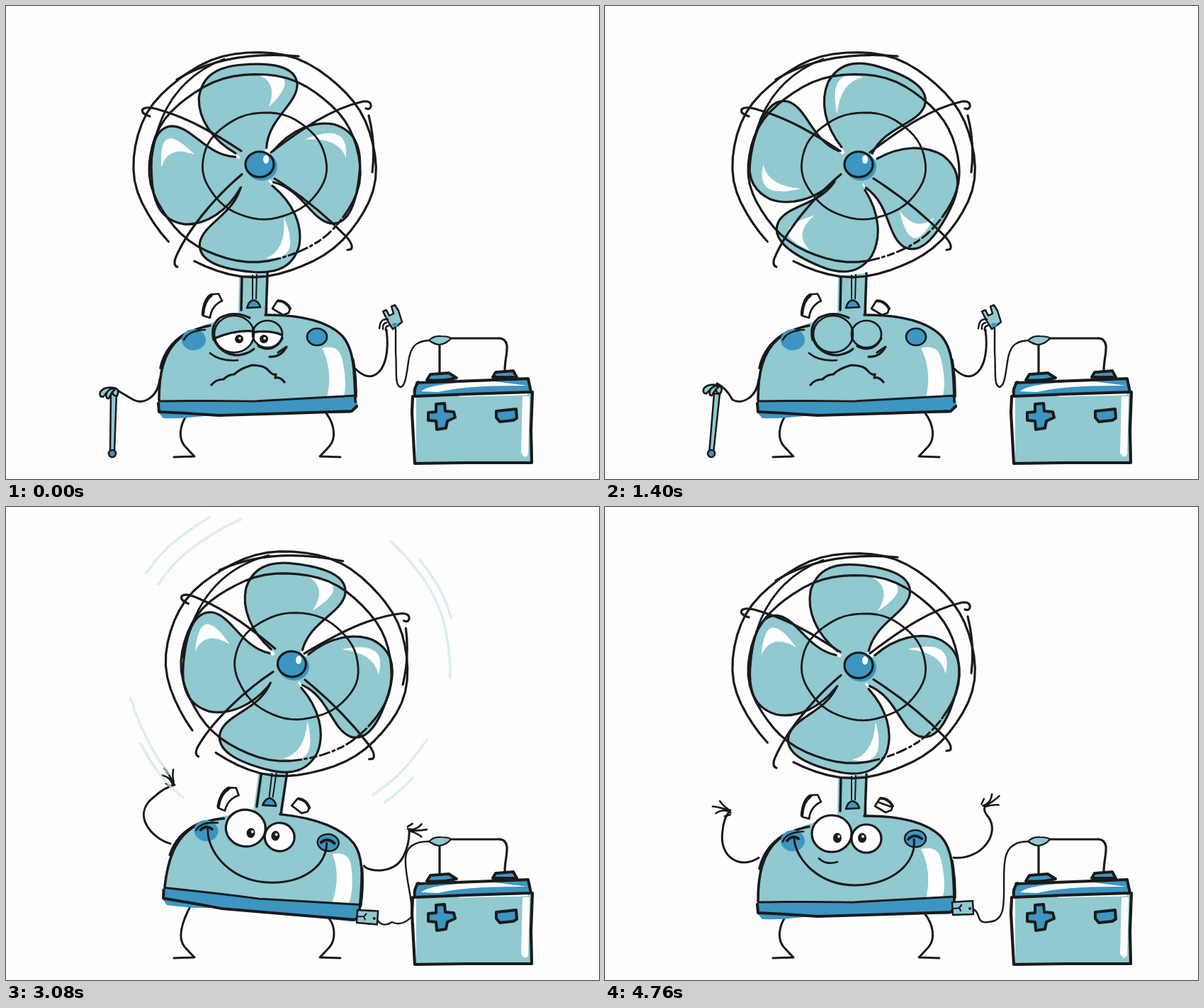
These frames come from a looping animation (837 by 669 pixels, 5.04 s). An HTML page:

```html
<!DOCTYPE html>
<html lang="en">
<head>
<meta charset="utf-8">
<title>Fan and battery</title>
<style>
  html, body { margin: 0; width: 100%; height: 100%; overflow: hidden; background: #fdfdfd; }
  svg { display: block; width: 100%; height: 100%; stroke-linecap: round; stroke-linejoin: round; }
</style>
</head>
<body>
<svg id="stage" viewBox="0 0 837 669"></svg>
<script>
const TEAL = '#90c9d0', BLUE = '#3c96c1', INK = '#1b1a1b', WHITE = '#fefefe', AIR = '#d0e7ed';
const STEP = 280, COUNT = 18, WAKE = 9;
const RAD = Math.PI / 180;

const area = (d, fill) => `<path d="${d}" fill="${fill}"/>`;
const line = (d, w = 3.2, color = INK, more = '') =>
  `<path d="${d}" fill="none" stroke="${color}" stroke-width="${w}" ${more}/>`;
const shape = (d, fill, w = 2.7) => `<path d="${d}" fill="${fill}" stroke="${INK}" stroke-width="${w}"/>`;
const oval = (x, y, rx, ry, fill, w = 0) =>
  `<ellipse cx="${x}" cy="${y}" rx="${rx}" ry="${ry}" fill="${fill}" stroke="${INK}" stroke-width="${w}"/>`;
const group = (transform, body, more = '') => `<g transform="${transform}" ${more}>${body}</g>`;

// Slightly uneven arc, angles in degrees clockwise from the right
function arc(cx, cy, rx, ry, from, to, wobble = .008) {
  const pts = [];
  const n = Math.ceil(Math.abs(to - from) / 6);
  for (let i = 0; i <= n; i++) {
    const a = (from + (to - from) * i / n) * RAD;
    const k = 1 + wobble * (Math.sin(4 * a + 1) + .5 * Math.sin(9 * a));
    pts.push(`${(cx + rx * k * Math.cos(a)).toFixed(1)} ${(cy + ry * k * Math.sin(a)).toFixed(1)}`);
  }
  return 'M' + pts.join('L');
}

// Blade turns at a few steps; the light moves a quarter with each
const turns = [[0, 0], [2, 25], [5, 110], [9, 201], [13, 360], [15, 452], [17, 549], [18, 630]];
const sway = [-.05, -1, 1, 0, -1, 0, 1, .5, 0];
const gusts = [0, .7, .7, .3, .15, .4, 1, .4, 0];
const caneTilt = [0, 0, 0, 8, 8, 4, 4, 8, 4, 0];

function sceneAt(i) {
  const k = turns.findLastIndex(([at]) => at <= i);
  const [t0, a0] = turns[k], [t1, a1] = turns[k + 1];
  const happy = i >= WAKE, w = happy ? sway[i - WAKE] : 0, size = Math.abs(w);
  return {
    happy,
    spin: a0 + (a1 - a0) * (i - t0) / (t1 - t0),
    light: 45 - 90 * (k % 3),
    tilt: 6 * w + .6 * size,
    dx: 8.5 * w - 2.5 * size,
    dy: -4.5 * size,
    bend: happy ? 0 : Math.sin(Math.PI * i / 5) ** 2,
    lid: 460 + 50 / (1 + 1.5 * (i - 5) ** 2),
    cane: caneTilt[i],
    wind: happy ? gusts[i - WAKE] : 0,
    plugged: i >= WAKE - 1,
    cheer: i === COUNT - 1,
    left: w < -.5 ? 'low' : w > 0 ? 'up' : 'wide',
    right: w < -.5 ? 'up' : i === COUNT - 1 ? 'wide' : 'reach',
  };
}

// Point of the leaning figure on the stage
function at(s, x, y) {
  const c = Math.cos(s.tilt * RAD), n = Math.sin(s.tilt * RAD), u = x - 355, v = y - 567;
  return [355 + s.dx + u * c - v * n, 567 + s.dy + u * n + v * c].map(k => +k.toFixed(1));
}

const battery =
  area('M579 548L741 546L744 646L579 646Z', TEAL) +
  area('M729 552H739L737 634Q733 642 727 632Z', WHITE) +
  area('M579 535L737 528L742 547L577 552Z', BLUE) +
  area('M586 545Q600 532 690 531L736 537Q650 536 610 546Z', WHITE) +
  line('M640 551L735 549', 3, WHITE) +
  line('M580 533L660 530L737 527L741 546L650 549L577 552Q575 540 582 532', 4) +
  line('M574 552L573 575L577 647L650 646L742 646L741 600L743 546', 4.2) +
  shape('M594 529L599 521L625 519L636 526Q616 531 594 529Z', BLUE, 4) +
  shape('M687 525L691 518L716 516L721 525Z', BLUE, 4) +
  line('M612 518V478M704 516C704 500 708 492 707 480Q705 469 694 470L626 470') +
  shape('M597 473Q604 466 614 467Q625 467 628 470Q622 478 611 479Q604 478 597 473Z', TEAL, 2.2) +
  shape('M607 563L619 562L620 573L632 574L634 582L623 587L621 597L608 599L607 587L596 586L596 575L607 574Z', BLUE, 4) +
  shape('M692 573L720 570L721 583L716 586L697 588L692 582Z', BLUE, 4);

const trunk =
  area('M329 382L367 378L370 438L328 438Z', TEAL) +
  line('M333 383L332 430M369 378L367 436', 3.5) + line('M348 381V414M354 380L353 414', 2) +
  shape('M340 427Q343 416 350 416Q357 418 359 426Z', BLUE) +
  area('M216 558C217 510 224 488 248 468C272 452 300 443 330 438L372 436C420 438 458 449 478 473C492 490 494 520 493 556Z', TEAL) +
  area('M446 484Q469 478 474 498Q482 530 477 552L453 554Q462 515 446 484Z', WHITE) +
  area('M216 558L350 559L494 551L497 568L486 576L300 577Q262 584 222 583L215 575Z', BLUE) +
  line('M216 557C216 520 222 490 245 470Q262 457 288 452', 3.6) + line('M218 512Q224 482 252 464', 3.4) +
  line('M366 437C420 436 456 448 474 466C491 484 492 515 493 560', 3.5) +
  line('M490 500Q495 528 494 553', 3.2) +
  line('M216 559Q290 558 350 559L494 551', 3) +
  line('M215 562L216 574Q260 576 300 579L400 576L488 573L495 566', 4);

const cage =
  line(arc(351, 224, 170, 158, 136, 480)) +
  line('M241 104Q310 62 413 71M512 155Q522 195 517 235') +
  line(arc(351, 229, 148, 132, 82, 323)) + line(arc(351, 229, 148, 132, -36, 32)) +
  line(arc(351, 229, 148, 132, 34, 82), 3, INK, 'stroke-dasharray="9 5 3 5 14 5"') +
  line('M308 75Q212 112 204 232', 2.8) +
  line(arc(365, 226, 87, 75, 0, 360), 2.8) +
  line('M203 156Q190 152 193 146Q198 141 217 147C262 160 300 184 332 205') +
  line('M374 207C420 172 460 145 504 135Q516 134 515 142Q514 147 508 145') +
  line('M379 244C420 270 455 300 481 327Q491 339 487 344L482 345') +
  line('M333 238C295 270 255 318 239 357Q236 367 242 369') +
  oval(361, 227, 22, 20, BLUE) + oval(358, 224, 20, 18, BLUE, 3.2) + oval(367, 217, 4, 6, WHITE);

// Radius, start and end angle of each air stroke around the hub
const gustLines = [
  [240, -148, -119], [217, -149, -109], [224, -51, 5], [236, -39, -16],
  [232, 168, 138], [243, 152, 129], [219, 58, 29], [237, 56, 43],
].map(([r, a, b]) => line(arc(357, 224, r, r, a - 6.6, b - 6.6), 3.5, AIR)).join('');

const bladePath = 'M18 -27C24 -68 66 -84 69 -112C70 -139 35 -147 -8 -147C-46 -147 -65 -133 -71 -105C-74 -76 -58 -45 -26 -23';
const shineRight = 'M12 -132Q84 -131 26 -84Q44 -120 12 -132Z';
const shineLeft = 'M-46 -66Q-78 -126 -26 -126Q-54 -112 -46 -66Z';

function fan(s) {
  let blades = oval(0, 0, 27, 25, TEAL);
  for (let i = 0; i < 4; i++) {
    const a = s.spin + 90 * i;
    const angle = a + 7 * Math.sin((a - 45) * RAD);
    const lit = Math.cos((s.light - angle - 90) * RAD) > 0 ? shineRight : shineLeft;
    blades += group(`rotate(${angle})`, area(bladePath + 'L0 0Z', TEAL) + area(lit, WHITE) + line(bladePath));
  }
  return group(`translate(357 224) rotate(${-s.tilt}) translate(-5 5)`, blades);
}

function sadFace(lid) {
  const low = lid > 463 ? 5 : 0;
  const eyes = oval(322, 464, 28, 26, WHITE) + oval(369, 464, 21, 19, WHITE);
  const pupil = x => oval(x + low, 471 - low, 6, 6, INK) + oval(x + low + 1, 470 - low, 1.8, 1.8, WHITE);
  return `<clipPath id="eyes">${eyes}</clipPath>` + eyes +
    `<g clip-path="url(#eyes)">` + pupil(329) + pupil(364 - low) +
    shape(`M280 420H352V${lid - 1}Q318 ${lid - 5} 280 ${lid + 16}Z`, TEAL, 3.2) +
    shape(`M349 420H400V${lid + 10}Q382 ${lid - 4} 349 ${lid}Z`, TEAL, 3.2) + '</g>' +
    oval(322, 464, 28, 26, 'none', 2.7) + oval(369, 464, 21, 19, 'none', 2.7) +
    line('M293 472Q288 452 302 441Q322 430 344 441M294 472Q303 493 328 494Q342 492 350 485M356 481Q378 492 390 470') +
    line('M288 491Q302 503 327 501', 2.7) + line('M372 496Q388 497 396 482L384 490', 3.2) +
    line('M290 536Q296 528 307 528Q314 521 322 521Q330 513 347 508Q364 508 370 515Q377 523 381 521L380 526Q387 524 393 532') +
    oval(439, 468, 14, 12, BLUE, 2.7) + line('M251 472Q258 459 281 458', 2.7);
}

const happyFace =
  oval(320, 462, 28, 26, WHITE, 3.2) + oval(369, 469, 21, 20, WHITE, 3.2) +
  oval(328, 468, 6, 7, INK) + oval(363, 468, 6, 7, INK) + oval(330, 466, 2, 2, WHITE) + oval(364, 466, 2, 2, WHITE) +
  oval(438, 469, 15, 12, BLUE, 2.5) + line('M251 473Q256 460 280 459', 2.7) +
  line('M267 470C270 500 303 535 353 535C408 534 440 502 436 470', 3) +
  line('M257 472Q264 463 273 469M428 470Q436 461 447 469', 4);

const brows = happy =>
  shape('M278 438Q278 415 289 408L300 407L305 417Q290 424 288 441Z', WHITE) +
  line('M278 436Q279 417 290 409', 4.5) +
  group(happy ? 'translate(5 -5)' : '',
    shape('M383 417Q395 416 401 428L399 434L391 437L376 428Z', WHITE) + line('M384 417Q395 417 401 428', 4));

function leg(s, x) {
  const b = s.bend, [tx, ty] = at(s, x, 576), flip = x > 355;
  const d = `M${flip ? 709 - tx : tx} ${ty}C${245 + 14 * b} 592 ${243 + 19 * b} 611 ${252 - b} ${622 + 3 * b}Q260 631 266 637L237 638`;
  return group(flip ? 'translate(709 0) scale(-1 1)' : '', line(d, 3));
}

function cane(angle) {
  const x = 153 + 72 * Math.sin(angle * RAD), y = 541 - angle * 1.8;
  return line(`M217 528C214 554 194 564 180 557Q171 ${552 - angle * 3} ${x} ${y}`, 3) +
    group(`rotate(${angle} 150 634)`,
      shape('M148 548H156L153 630H147Z', TEAL, 2.5) + oval(150, 633, 5, 5, BLUE, 2.7) +
      group(`translate(0 ${-angle})`,
        shape('M133 546Q138 538 152 540Q161 541 157 551Q152 553 150 546L145 555Q140 556 142 547L137 553Q131 553 133 546Z', TEAL) +
        line('M142 547Q146 541 152 541M150 546L155 541', 2.7)));
}

// Path from the shoulder, then the hand's place and turn
const arms = {
  left: {
    low: ['C185 538 135 525 138 466', 138, 466, 185],
    up: ['C208 470 175 436 209 410Q223 397 238 393', 236, 391, -120],
    wide: ['C190 514 160 494 166 458Q167 440 177 429', 176, 430, -165],
  },
  right: {
    reach: ['C512 516 548 520 561 494Q570 476 569 457', 569, 457, -2],
    up: ['C506 467 520 407 492 394L475 389', 476, 389, -62],
    wide: ['C530 500 560 462 540 437Q534 430 536 424', 536, 423, -35],
  },
};

function arm(s, side) {
  const [path, x, y, turn] = arms[side][s[side]];
  return line(`M${at(s, side === 'left' ? 217 : 492, 496)}${path}`, 3) +
    group(`translate(${x} ${y}) rotate(${turn})`,
      line('M-2 -2Q9 2 18 -8M0 0Q14 2 25 0M0 1Q10 4 17 10M-2 -5L5 -9', 2.6));
}

function cable(s) {
  const [x, y] = at(s, 518, 568);
  const tail = s.tilt > 2
    ? `Q${x + 8} ${y + 14} ${x + 22} 587Q558 594 572 580C576 560 562 520 564 496`
    : `C${x + 14} ${y + 5} ${x + 4} ${y + 22} ${x + 23} ${y + 19}C${x + 54} ${y + 18} 560 545 564 504`;
  return line(`M${x} ${y}${tail}Q566 473 597 473`, 2.4);
}

const heldPlug =
  line('M597 473C578 474 571 482 568 503C565 525 563 538 557 539C548 537 552 515 550 490V456', 2.4) +
  line('M493 513C500 520 508 526 518 523C535 517 541 490 537 458', 3) +
  shape('M532 432L537 430L541 438L547 435L544 425L549 423L554 431L559 447L546 457L539 446Z', TEAL, 2.5) +
  oval(549, 451, 4, 3, BLUE) +
  line('M539 443Q530 442 528 450L527 456M537 448Q531 449 532 457M540 452Q535 453 536 459', 2.5);

const plug = shape('M490 559L519 557L520 576L491 577Z', TEAL, 2.5) +
  line('M492 568L500 567L503 563M502 571L500 567', 2.2) + oval(515, 568, 2, 2, INK);

function draw(s) {
  const lean = `translate(${355 + s.dx} ${567 + s.dy}) rotate(${s.tilt}) translate(-355 -567)`;
  const rightArm = s.happy ? arm(s, 'right') : s.plugged ? line('M493 513C515 515 535 540 512 556', 3) : '';
  return battery + leg(s, 257) + leg(s, 452) +
    (s.cane === undefined ? arm(s, 'left') : cane(s.cane)) +
    (s.plugged ? cable(s) : heldPlug) + rightArm +
    group(lean,
      group('', gustLines, `opacity="${s.wind}"`) +
      trunk + oval(265, 472, 17, 15, BLUE) +
      brows(s.happy) + (s.happy ? happyFace : sadFace(s.lid)) +
      (s.cheer ? line('M302 497Q312 507 328 502M387 418L404 424', 2.7) : '') +
      (s.plugged ? plug : '') + fan(s) + cage);
}

const stage = document.getElementById('stage');
const scenes = Array.from({ length: COUNT }, (_, i) => draw(sceneAt(i)));
let shown = -1;

function tick() {
  const i = Math.floor(performance.now() / STEP) % COUNT;
  if (i !== shown) stage.innerHTML = scenes[shown = i];
  requestAnimationFrame(tick);
}
tick();
</script>
</body>
</html>
```
